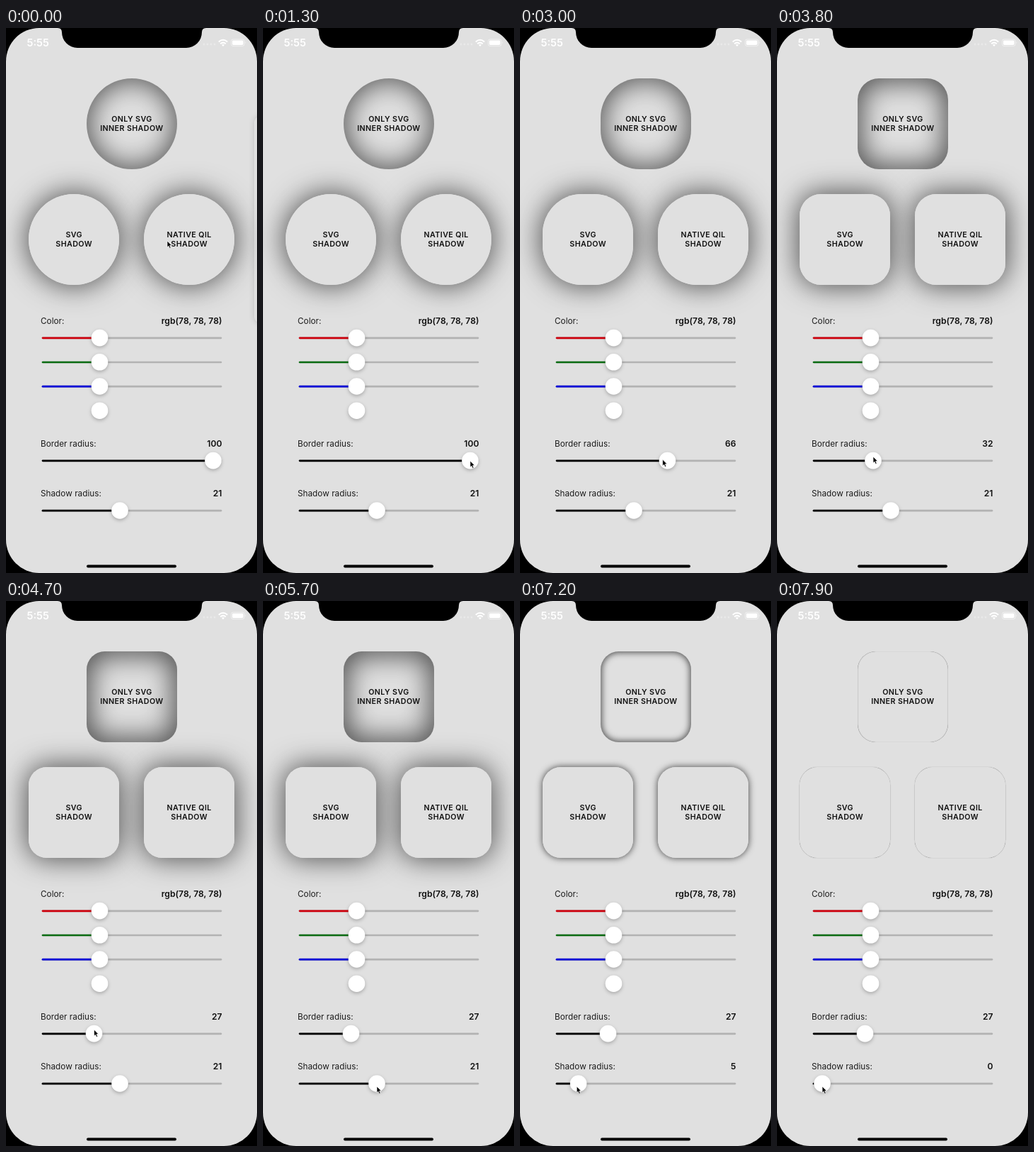
Animation, 355 px wide and 768 px high, one loop 8 s. Source, as an HTML page:

```html
<!DOCTYPE html>
<html lang="en">
<head>
<meta charset="utf-8">
<title>Shadow playground</title>
<style>
  html, body { margin: 0; width: 100%; height: 100%; overflow: hidden; background: #000; }
  #stage { position: relative; width: 355px; height: 768px; overflow: hidden; background: #000; }
  #screen { position: absolute; inset: 0; border-radius: 47px; background: #e0e0e0; overflow: hidden; }
  .box { position: absolute; width: 128px; height: 128px; border-radius: var(--radius); }
  .drop { box-shadow: 0 0 var(--blur) var(--outer) rgb(78, 78, 78); }
  .face { background: #e0e0e0; }
  .inner { box-shadow: inset 0 0 var(--blur) var(--inner) rgb(78, 78, 78); }
  .top { left: 113.5px; top: 71px; }
  .left { left: 32px; top: 234px; }
  .right { left: 195px; top: 234px; }
  #edge { position: absolute; left: 351px; top: 125px; width: 30px; height: 290px; border-radius: 8px; box-shadow: 0 0 8px rgba(0, 0, 0, .16); }
  svg { position: absolute; inset: 0; }
  text { font-family: Inter, "Open Sans", sans-serif; fill: #111; }
  .label { font-size: 11.7px; letter-spacing: .05px; fill: #1c1c1c; }
  .value { font-size: 12.2px; font-weight: 600; text-anchor: end; }
  .title { font-size: 10.7px; font-weight: 600; letter-spacing: .4px; text-anchor: middle; }
  .clock { font-size: 14.5px; font-weight: 600; fill: #fff; }
  .thumb { fill: #fff; filter: drop-shadow(0 2px 2.5px rgba(0, 0, 0, .25)); }
  .track { stroke-width: 2.7; stroke-linecap: round; }
</style>
</head>
<body>
<div id="stage">
  <div id="screen">
    <div id="edge"></div>
    <div class="box drop left"></div>
    <div class="box drop right"></div>
    <div class="box face inner top"></div>
    <div class="box face left"></div>
    <div class="box face right"></div>
  </div>
  <svg width="355" height="768" viewBox="0 0 355 768">
    <path d="M73 0Q79 0 79 6A22 22 0 0 0 101 28H255A22 22 0 0 0 277 6Q277 0 283 0Z"/>
    <text class="clock" x="29.5" y="26">5:55</text>
    <path d="M280 23H296" stroke="#fff" stroke-width="2.8" stroke-linecap="round" stroke-dasharray="0 5" opacity=".3"/>
    <g fill="none" stroke="#fff" stroke-width="2">
      <path d="M300.8 19.5Q307 14 313.2 19.5M303.2 22.3Q307 18.9 310.8 22.3"/>
      <path d="M305 23.8Q307 22.4 309 23.8L307 26Z" fill="#fff" stroke="none"/>
    </g>
    <rect x="318.5" y="16" width="18.5" height="9.5" rx="2.6" fill="none" stroke="#fff" stroke-opacity=".5"/>
    <rect x="320" y="17.5" width="15.5" height="6.5" rx="1.4" fill="#fff"/>
    <path d="M338.5 19V22.5Q340 20.75 338.5 19Z" fill="#fff" opacity=".6"/>

    <text class="title" x="177.9" y="132">ONLY SVG</text>
    <text class="title" x="177.9" y="145.2">INNER SHADOW</text>
    <text class="title" x="96.2" y="294.8">SVG</text>
    <text class="title" x="96.2" y="308">SHADOW</text>
    <text class="title" x="259.2" y="294.8">NATIVE QIL</text>
    <text class="title" x="259.2" y="308">SHADOW</text>

    <text class="label" x="49" y="416.5">Color:</text>
    <text class="value" x="305.5" y="416.5">rgb(78, 78, 78)</text>
    <text class="label" x="49" y="590">Border radius:</text>
    <text class="value" x="305.5" y="590" id="radiusText"></text>
    <text class="label" x="49" y="660.3">Shadow radius:</text>
    <text class="value" x="305.5" y="660.3" id="shadowText"></text>
    <g id="sliders"></g>
    <rect x="114" y="756.6" width="127" height="4" rx="2"/>
    <path id="cursor" d="M0 0V9L2 7.2L3.5 10.4L5.1 9.7L3.7 6.5H6.4Z" stroke="#fff" stroke-width=".7" stroke-linejoin="round"/>
  </svg>
</div>
<script>
const LOOP = 8000, STEP = 100, LAG = 50, SCALE = 355 / 375, ZERO_X = 62.5;
const byId = id => document.getElementById(id);

function ease(t, from, to) {
  const k = Math.min(1, Math.max(0, (t - from) / (to - from)));
  return k * k * (3 - 2 * k);
}

const mix = (a, b, k) => a + (b - a) * k;

// Each move eases from the previous value: [start ms, end ms, value].
const follow = (first, ...moves) => t =>
  moves.reduce((value, [from, to, next]) => mix(value, next, ease(t, from, to)), first);

const radiusX = follow(293, [1500, 2200, 242], [2580, 3700, 136], [4200, 4500, 124.5]);
const shadowX = follow(161, [6100, 6400, 106], [6500, 7800, 64]);
const hoverX = follow(228, [0, 600, 258], [700, 1300, 293]);
const cursorY = follow(300, [0, 600, 525], [700, 1300, 610], [2580, 3700, 604], [4700, 5200, 684]);

// The hand leads the dragged thumb slightly.
function cursorX(t) {
  if (t < 1500) return hoverX(t);
  return mix(radiusX(t + LAG), shadowX(t + LAG), ease(t, 4700, 5200));
}

function add(tag, attrs) {
  const el = document.createElementNS("http://www.w3.org/2000/svg", tag);
  for (const name in attrs) el.setAttribute(name, attrs[name]);
  return byId("sliders").appendChild(el);
}

function slider(y, color, x) {
  const line = (x2, stroke) => add("line", { class: "track", x1: 52, x2, y1: y, y2: y, stroke });
  if (color !== "none") line(304, "#b2b2b2");
  const fill = line(x, color);
  const thumb = add("circle", { class: "thumb", cx: x, cy: y - .2, r: 11.8 });
  return px => {
    fill.setAttribute("x2", px);
    thumb.setAttribute("cx", px);
  };
}

["#ce000d", "#0b6c12", "#0000d8", "none"].forEach((color, i) => slider(436.8 + 34.2 * i, color, 132.5));
const moveRadius = slider(609.8, "#000", 293);
const moveShadow = slider(680.2, "#000", 161);

// Large radii flatten out until they snap to a full circle.
function cornerRadius(value) {
  const r = value * SCALE;
  if (value >= 68) return 64;
  return r < 42 ? r : mix(42, r, .65);
}

function draw(t) {
  moveRadius(radiusX(t));
  moveShadow(shadowX(t));

  const radius = Math.round((radiusX(t - LAG) - ZERO_X) / 2.305);
  const shadow = Math.round((shadowX(t - LAG) - ZERO_X) / 4.6);
  byId("radiusText").textContent = radius;
  byId("shadowText").textContent = shadow;

  const corner = cornerRadius(radius);
  const set = (name, px) => byId("screen").style.setProperty(name, px + "px");
  set("--radius", corner);
  set("--blur", Math.max(.8, shadow * 2 * SCALE));
  set("--outer", .1 + shadow * .09);
  set("--inner", .1 + shadow * mix(.4, .1, corner / 64));
  byId("edge").style.visibility = t < 1000 ? "visible" : "hidden";
  byId("cursor").setAttribute("transform", `translate(${cursorX(t)} ${cursorY(t)})`);
}

const start = performance.now();
function tick() {
  const t = (performance.now() - start) % LOOP;
  draw(Math.floor(t / STEP) * STEP);
  requestAnimationFrame(tick);
}
tick();
</script>
</body>
</html>
```
